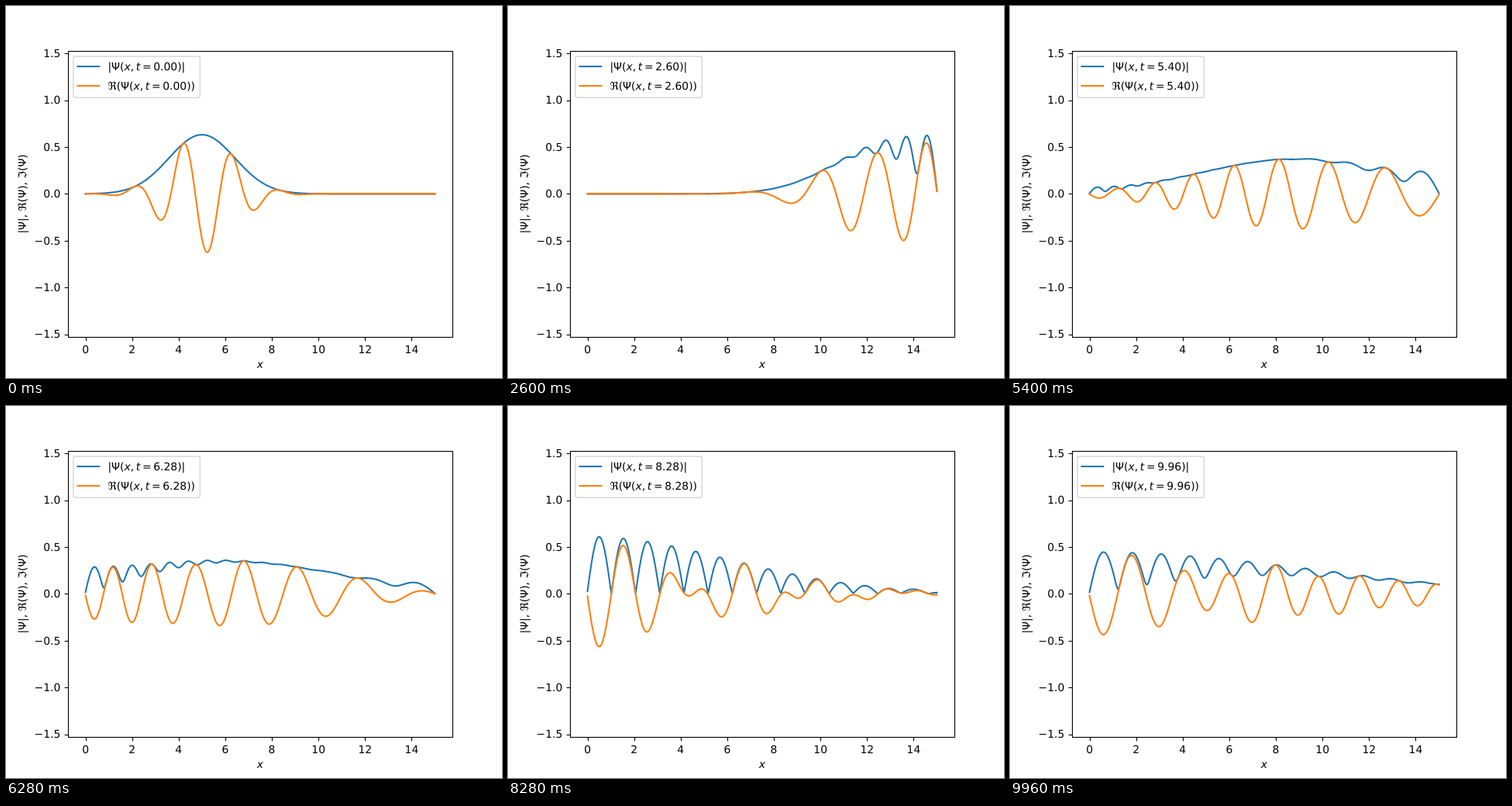
Animation of 640 by 480 pixels, one loop 10 s. Source, as an HTML page:

```html
<!DOCTYPE html>
<html lang="en">
<head>
<meta charset="utf-8">
<title>Wave packet in a box</title>
<style>
  html, body { margin: 0; width: 100%; height: 100%; overflow: hidden; background: #fff; }
  svg { display: block; width: 640px; height: 480px; }
  text { font: 13.889px "DejaVu Sans", sans-serif; text-rendering: geometricPrecision; white-space: pre; }
  .it { font-style: oblique; }
  .mid { text-anchor: middle; }
  .end { text-anchor: end; }
  .axis { fill: none; stroke: #000; stroke-width: 1.11; }
  .line { fill: none; stroke-width: 2.083; stroke-linecap: square; stroke-linejoin: round; }
  .abs { stroke: #1f77b4; }
  .re { stroke: #ff7f0e; }
</style>
</head>
<body>
<svg viewBox="0 0 640 480">
  <path class="line abs" id="abs"/>
  <path class="line re" id="re"/>
  <g id="ticks"></g>
  <rect class="axis" x="80.5" y="58.5" width="496" height="369"/>
  <text class="it mid" x="327.9" y="467">x</text>
  <text class="mid" transform="translate(26 242.4) rotate(-90)">|Ψ|, ℜ(Ψ), ℑ(Ψ)</text>
  <rect x="86.9" y="65" width="163.4" height="53.2" rx="2.8" fill="#fff" fill-opacity=".8" stroke="#d6d6d6" stroke-width="1.39"/>
  <path class="line abs" d="M92.5 78H120.3"/>
  <path class="line re" d="M92.5 103H120.3"/>
  <text x="131.4" y="83">|Ψ(<tspan class="it">x</tspan>,<tspan class="it" dx="2.7">t</tspan><tspan dx="2.7">=</tspan><tspan class="time" dx="2.7">0.00</tspan>)|</text>
  <text x="131.4" y="108">ℜ(Ψ(<tspan class="it">x</tspan>,<tspan class="it" dx="2.7">t</tspan><tspan dx="2.7">=</tspan><tspan class="time" dx="2.7">0.00</tspan>))</text>
</svg>
<script>
const LOOP = 10000, STEP = 40;
const POINTS = 1000, LENGTH = 15, DX = LENGTH / (POINTS - 1);
const X0 = 5, K = 3;
const PERIOD = 2 * (LENGTH + 2 * DX); // walls sit one grid cell outside the plot

const px = x => 102.545 + 30.0606 * x;
const py = y => 242.4 - 120.8 * y;
const $ = id => document.getElementById(id);

function drawTicks() {
  let out = '';
  for (let x = 0; x <= 14; x += 2) {
    out += `<path class="axis" d="M${Math.round(px(x)) + .5} 427.5v4.86"/>` +
           `<text class="mid" x="${px(x)}" y="448">${x}</text>`;
  }
  for (let y = -1.5; y <= 1.5; y += .5) {
    const label = y.toFixed(1).replace('-', '\u2212');
    out += `<path class="axis" d="M80.5 ${Math.round(py(y)) + .5}h-4.86"/>` +
           `<text class="end" x="70.3" y="${Math.round(py(y) + 4.8)}">${label}</text>`;
  }
  $('ticks').innerHTML = out;
}

// Spreading Gaussian packet in free space (unit mass, unit width).
function packet(t) {
  const b = t / 2, s = 1 + b * b;
  const amp = (2 * Math.PI * s) ** -.25;
  const phase0 = -K * K * t / 2 - Math.atan(b) / 2;
  return y => {
    const q = (y - X0 - K * t) ** 2 / (4 * s);
    const a = amp * Math.exp(-q), p = K * y + phase0 + b * q;
    return [a * Math.cos(p), a * Math.sin(p)];
  };
}

// Both hard walls are met by summing mirror images of the free packet.
function psi(free, x) {
  let re = 0, im = 0;
  for (let n = -1; n <= 1; n++) {
    const a = free(x + n * PERIOD);
    const b = free(-2 * DX - x + n * PERIOD);
    re += a[0] - b[0];
    im += a[1] - b[1];
  }
  return [re, im];
}

const times = document.querySelectorAll('.time');
let shown = -1;

function draw(ms) {
  const step = Math.floor(ms % LOOP / STEP);
  if (step === shown) return;
  shown = step;
  const t = step * STEP / 1000, free = packet(t);
  const absPts = [], rePts = [];
  for (let i = 0; i < POINTS; i++) {
    const x = i * DX, [re, im] = psi(free, x);
    const sx = px(x).toFixed(2);
    absPts.push(sx + ' ' + py(Math.hypot(re, im)).toFixed(2));
    rePts.push(sx + ' ' + py(re).toFixed(2));
  }
  $('abs').setAttribute('d', 'M' + absPts.join('L'));
  $('re').setAttribute('d', 'M' + rePts.join('L'));
  times.forEach(el => el.textContent = t.toFixed(2));
}

function loop() {
  draw(performance.now());
  requestAnimationFrame(loop);
}

drawTicks();
loop();
</script>
</body>
</html>
```
